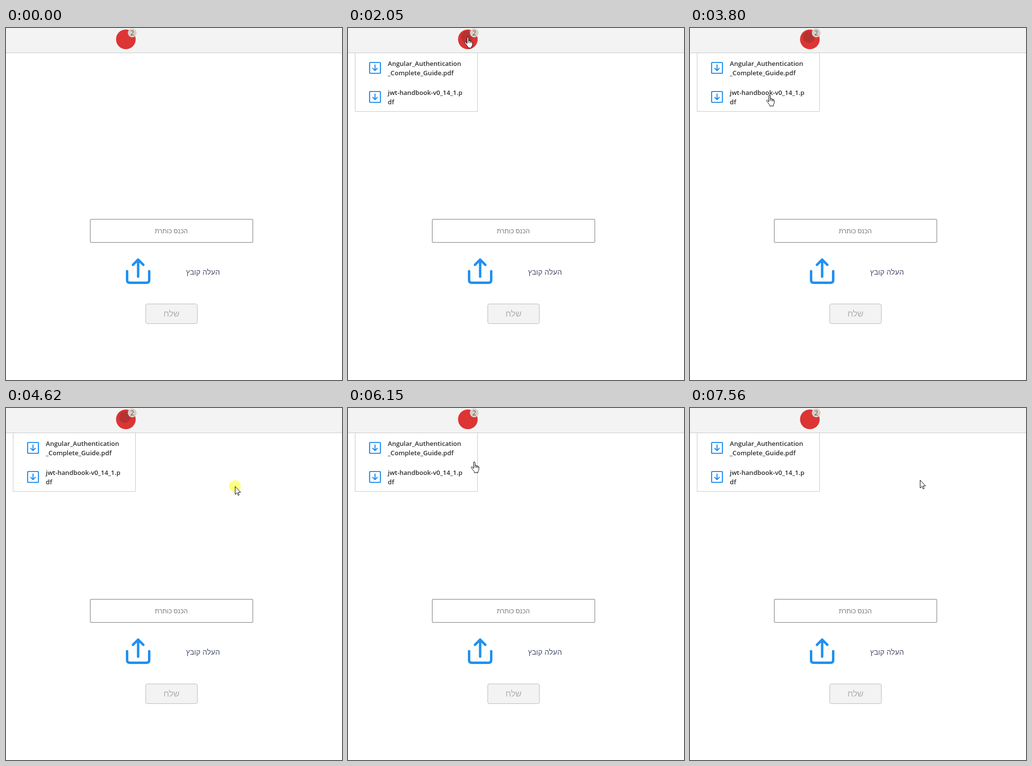
Animation of 684x715 px, one loop 8 s. Source, as an HTML page:

```html
<!DOCTYPE html>
<html lang="he">
<head>
<meta charset="utf-8">
<style>
  html, body { margin: 0; width: 100%; height: 100%; overflow: hidden; background: #fff; }
  svg { display: block; width: 100%; height: 100%; }
  text { font-family: "Liberation Sans", Arial, sans-serif; }
  .ui { font-family: "Open Sans", "Noto Sans", sans-serif; }
  .file { font-size: 13.1px; font-weight: 600; fill: #2b2e31; }
  .mid { text-anchor: middle; }
  .icon { fill: none; stroke: #2190f0; stroke-linecap: round; stroke-linejoin: round; }
  .cursor { fill: #fff; stroke: #000; }
</style>
</head>
<body>
<svg viewBox="0 0 684 715">
  <defs>
    <g id="download" class="icon" stroke-width="2.2">
      <rect x="44" y="70" width="22" height="22" rx="1.5"/>
      <path d="M55 75V86M50.5 82L55 86.5L59.5 82"/>
    </g>
  </defs>

  <rect width="684" height="50" fill="#f3f3f3"/>
  <path d="M0 50.5H684" stroke="#c8c8c8"/>
  <circle cx="244" cy="23" r="20" fill="#dd3434"/>
  <circle id="shade" cx="242" cy="18" r="12" fill="#b53232"/>
  <circle cx="257" cy="10" r="9" fill="#d8d0c8"/>
  <text class="ui mid" x="257" y="15" font-size="14" fill="#555">2</text>

  <g id="panel">
    <path d="M14.5 51V169.5H263.5V51" fill="#fff" stroke="#c8c8c8"/>
    <use href="#download"/>
    <use href="#download" y="59"/>
    <g class="file">
      <text class="ui" x="81" y="77">Angular_Authentication</text>
      <text class="ui" x="81" y="96">_Complete_Guide.pdf</text>
      <text class="ui" x="81" y="136">jwt-handbook-v0_14_1.p</text>
      <text class="ui" x="81" y="155">df</text>
    </g>
  </g>

  <rect x="171.5" y="388.5" width="331" height="47" rx="1.5" fill="#fff" stroke="#767676"/>
  <text class="mid" x="336.5" y="417" font-size="13" fill="#757575">הכנס כותרת</text>
  <path class="icon" stroke-width="5" d="M269 505V471M258.5 481L269 470.5L279.5 481M246.5 494V512Q246.5 517.5 252 517.5H286Q291.5 517.5 291.5 512V494"/>
  <text class="mid" x="401" y="501" font-size="15" fill="#4a4f6a">העלה קובץ</text>
  <rect x="284.5" y="560.5" width="105" height="40" rx="3.5" fill="#f3f3f3" stroke="#bababa"/>
  <text class="mid" x="337" y="586" font-size="17" fill="#adadad">שלח</text>

  <g id="pointer">
    <circle id="press" r="12" fill="#ff0" fill-opacity=".5"/>
    <path id="arrow" class="cursor" d="M.5 .5V16.5L4.2 13.2L6.6 18.5L8.8 17.5L6.5 12.3H11.5Z"/>
    <path id="hand" class="cursor" transform="translate(-6 0)" d="M5.5 14V2Q5.5 .5 7 .5T8.5 2V8.5Q8.5 7.3 10 7.3T11.5 9Q11.5 8 12.8 8.2T14 10Q14 9 15.2 9.3T16.5 11V15.5Q16.5 18 14.5 20V22.5H7.5V20.5Q5 18 3.5 15.5L1 12.5Q.3 11 1.5 10.4T4 11.7ZM8.5 8.5V12M11.5 9V12.5M14 10V13"/>
  </g>
</svg>
<script>
const LOOP = 8000, FRAME = 68, PRESS = 130;
const bell = [243, 18];
// Each move: start time, number of frames, where it ends
const moves = [
  [770, 7, [227, 99]],
  [1260, 3, [256, 32]],
  [1660, 2, bell],
  [2510, 7, [173, 76]],
  [3280, 3, [161, 136]],
  [4000, 5, [466, 159]],
  [5090, 6, bell],
  [6010, 3, [256, 109]],
  [6350, 2, [248, 107]],
  [7150, 7, [468, 146]]
];
const presses = [1920, 4620, 5620, 6630];
const $ = id => document.getElementById(id);
const show = (id, on) => $(id).style.display = on ? "" : "none";
const within = (v, a, b) => v >= a && v < b;
const ease = p => p * p * (3 - 2 * p);

function position(t) {
  let x = 613, y = 715;
  for (const [start, frames, [toX, toY]] of moves) {
    if (t < start) break;
    const step = 1 + Math.floor((t - start) / FRAME);
    const p = ease(Math.min(1, step / frames));
    x += (toX - x) * p;
    y += (toY - y) * p;
  }
  return [Math.round(x), Math.round(y)];
}

function draw(t) {
  const [x, y] = position(t);
  const open = within(t, 2050, 4750) || t >= 5680;
  const overPanel = open && within(x, 14, 264) && within(y, 51, 170);
  const link = overPanel || Math.hypot(x - 244, y - 23) < 20;
  show("panel", open);
  show("shade", within(t, 1920, 5680));
  show("pointer", t >= 770);
  show("press", presses.some(start => within(t, start, start + PRESS)));
  show("hand", link);
  show("arrow", !link);
  $("pointer").setAttribute("transform", `translate(${x} ${y})`);
}

function tick() {
  draw(performance.now() % LOOP);
  requestAnimationFrame(tick);
}
tick();
</script>
</body>
</html>
```
